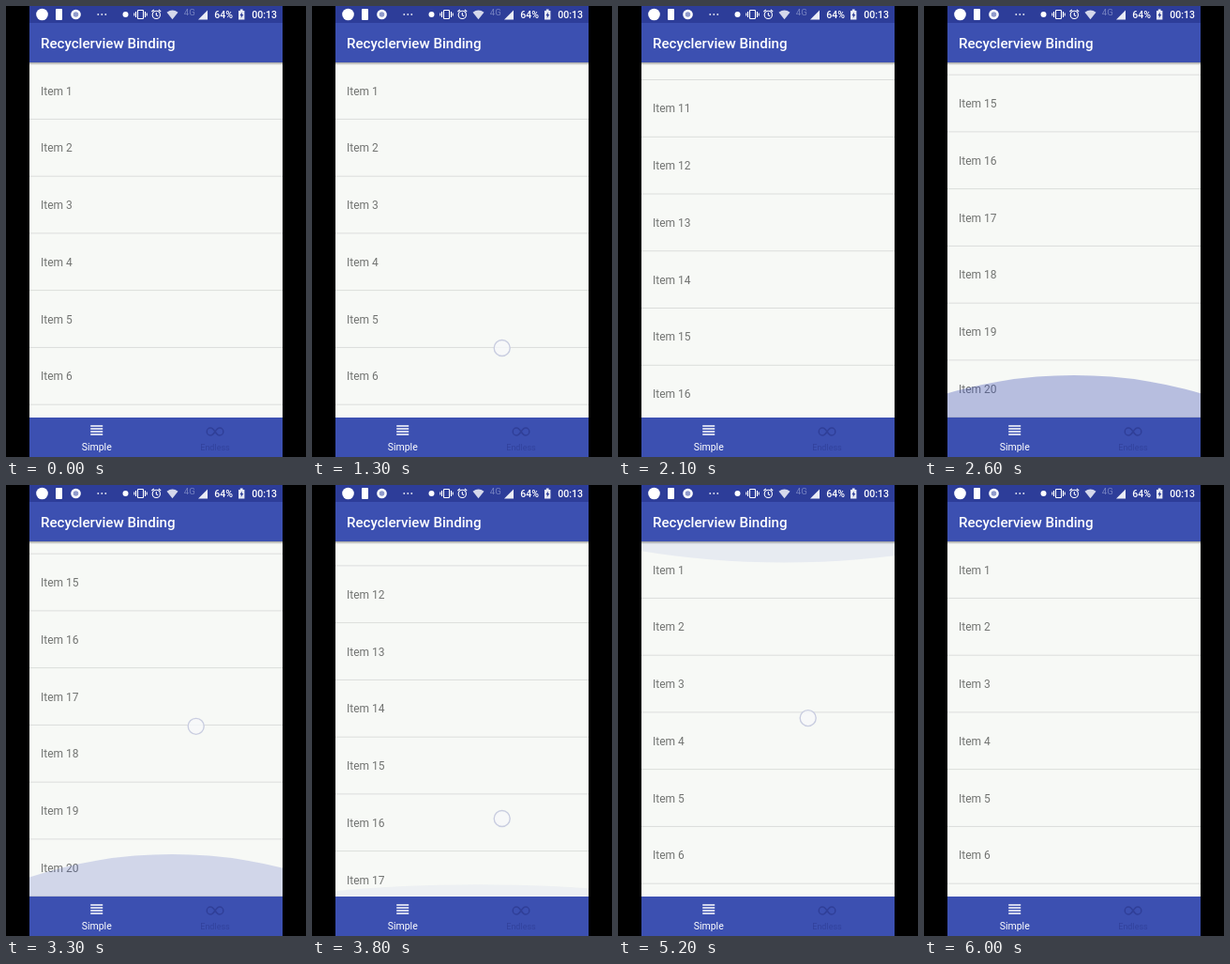
Write an HTML page that moves like this. It is 320 px wide and 480 px high and loops after 6100 ms.

```html
<!DOCTYPE html>
<html lang="en">
<head>
<meta charset="utf-8">
<title>Recyclerview Binding</title>
<style>
  html, body { margin: 0; width: 100%; height: 100%; overflow: hidden; background: #000; }
  svg { display: block; font-family: Roboto, sans-serif; }
  #rows text { font-size: 12px; fill: #727472; }
  #rows rect { fill: #d9dbd9; }
  .glow { fill: #3f51b5; }
  .status { font-size: 10.5px; font-weight: 500; }
</style>
</head>
<body>
<svg width="320" height="480" viewBox="0 0 320 480">
  <defs>
    <linearGradient id="shade" x2="0" y2="1">
      <stop stop-color="#000" stop-opacity=".36"/>
      <stop offset="1" stop-color="#000" stop-opacity="0"/>
    </linearGradient>
  </defs>
  <rect width="320" height="480"/>

  <svg x="25" y="60" width="270" height="378" overflow="hidden">
    <rect width="270" height="378" fill="#f7f9f6"/>
    <g id="rows"></g>
    <ellipse id="topGlow" class="glow"/>
    <ellipse id="bottomGlow" class="glow"/>
  </svg>
  <rect x="25" y="60" width="270" height="3" fill="url(#shade)"/>

  <rect x="25" width="270" height="18" fill="#2d3d99"/>
  <rect x="25" y="18" width="270" height="42" fill="#3c50b1"/>
  <text x="37" y="45" font-size="15.1" font-weight="500" fill="#fff">Recyclerview Binding</text>

  <!-- status icons -->
  <g fill="#fff">
    <circle cx="38.5" cy="9" r="6.3"/>
    <rect x="53" y="3" width="7" height="12" rx="1"/>
    <circle cx="74.5" cy="9" r="5.3"/>
    <circle cx="74.5" cy="9" r="2.8" fill="#8f9acb"/>
    <path d="M97.5 9h1.6M101.5 9h1.6M105.5 9h1.6" stroke="#fff" stroke-width="1.6"/>
    <circle cx="127.5" cy="9" r="3"/>
    <path d="M171.5 6.8q6-4.6 12 0l-6 7.4z" opacity=".8"/>
    <path d="M205 14.5h10v-10z" opacity=".9"/>
    <path d="M248 5h1.8v-1.5h2.8V5h1.8v9.5h-6.4z" opacity=".9"/>
    <path d="M251.8 6.5l-2.4 3.8h1.4v2.7l2.4-3.9h-1.4z" fill="#2d3d99"/>
    <text class="status" x="222.3" y="13">64%</text>
    <text class="status" x="262.3" y="13">00:13</text>
    <text x="189.8" y="9.8" font-size="9.6" fill="#7682c0">4G</text>
  </g>
  <g fill="none" stroke="#fff" stroke-width="1.1">
    <rect x="140.5" y="4.5" width="6" height="9" rx=".8"/>
    <path d="M138.5 6v6M148.5 6v6M136.8 7.5v3M150.2 7.5v3"/>
    <circle cx="160.3" cy="9.4" r="4.1"/>
    <path d="M160.3 7v2.8l1.8 1M155.4 6l2.4-2M165.2 6l-2.4-2"/>
  </g>

  <!-- bottom navigation -->
  <rect x="25" y="438" width="270" height="42" fill="#3c50b1"/>
  <path d="M90.2 447h13M90.2 450h13M90.2 453h13M90.2 456h13" stroke="#fff" stroke-width="1.7"/>
  <text x="96.7" y="472.8" font-size="10.5" fill="#fff" text-anchor="middle">Simple</text>
  <path d="M223 453c-2-3-3.2-4-4.8-4a4 4 0 0 0 0 8c1.6 0 2.8-1 4.8-4s3.2-4 4.8-4a4 4 0 0 1 0 8c-1.6 0-2.8-1-4.8-4z"
    fill="none" stroke="#303f98" stroke-width="1.5"/>
  <text x="223" y="472.8" font-size="9" fill="#32429c" text-anchor="middle">Endless</text>

  <circle id="finger" cx="202.7" r="8.5" fill="#f6f7fa" fill-opacity=".8" stroke="#c9cde0" stroke-width="1.4"/>
</svg>
<script>
const LOOP = 6100, STEP = 100, ROW = 60.75, COUNT = 20, VIEW = 378, END = ROW * COUNT - VIEW;
const GLOW_RADIUS = 405, GLOW_DEPTH = 350.7, FRICTION = 1800;
const el = id => document.getElementById(id);
const clamp = (v, max = 1) => Math.min(max, Math.max(0, v));
const square = p => p * p;
const smooth = p => p * p * (3 - 2 * p);

el('rows').innerHTML = Array.from({ length: COUNT }, (_, i) =>
  `<text x="12" y="${i * ROW + 34.6}">Item ${i + 1}</text>
   <rect y="${(i + 1) * ROW - 0.8}" width="270" height=".9"/>`).join('');

const gesture = (start, length, from, to, ease) => ({ start, length, from, to, ease });
const fingerY = (g, t) => g.from + (g.to - g.from) * g.ease(clamp((t - g.start) / g.length));

// A swipe flings the list to one end; a second drag pulls past that end.
const down = { swipe: gesture(1300, 300, 364, 169, square), reach: 1623, pull: gesture(3000, 400, 364, 237, smooth) };
const up = { swipe: gesture(3500, 300, 160, 355, square), reach: 2224, pull: gesture(5000, 500, 190, 355, smooth) };
const gestures = [down.swipe, down.pull, up.swipe, up.pull];

function travel({ swipe, reach }, t) {
  const flung = Math.max(0, t - swipe.start - swipe.length);
  const dragged = Math.abs(fingerY(swipe, t) - swipe.from);
  return clamp(dragged + reach * (1 - Math.exp(-flung / FRICTION)), END);
}

function hitTime({ swipe, reach }) {
  const rest = END - Math.abs(swipe.to - swipe.from);
  return swipe.start + swipe.length - FRICTION * Math.log(1 - rest / reach);
}

// Rises to 1, then fades out evenly.
const pulse = (t, rise, fall) => t < rise ? smooth(clamp(t / rise)) : clamp(1 - (t - rise) / fall);

function setGlow(node, move, t, edge, side) {
  const { pull } = move;
  const strength = Math.max(pulse(t - hitTime(move), 90, 600), .71 * pulse(t - pull.start, pull.length, 500));
  const scale = .83 * clamp(2 * strength);
  node.setAttribute('cx', t > pull.start ? 152 : 135);
  node.setAttribute('cy', edge + side * GLOW_DEPTH * scale);
  node.setAttribute('rx', GLOW_RADIUS);
  node.setAttribute('ry', GLOW_RADIUS * scale);
  node.setAttribute('opacity', .35 * strength);
}

function draw(now) {
  const t = Math.floor(now % LOOP / STEP) * STEP;
  el('rows').setAttribute('transform', `translate(0 ${travel(up, t) - travel(down, t)})`);
  setGlow(el('bottomGlow'), down, t, VIEW, 1);
  setGlow(el('topGlow'), up, t, 0, -1);
  const active = gestures.find(g => t >= g.start && t <= g.start + g.length);
  el('finger').setAttribute('visibility', active ? 'visible' : 'hidden');
  if (active) el('finger').setAttribute('cy', fingerY(active, t));
}

const start = performance.now();
function tick() {
  draw(performance.now() - start);
  requestAnimationFrame(tick);
}
tick();
</script>
</body>
</html>
```
